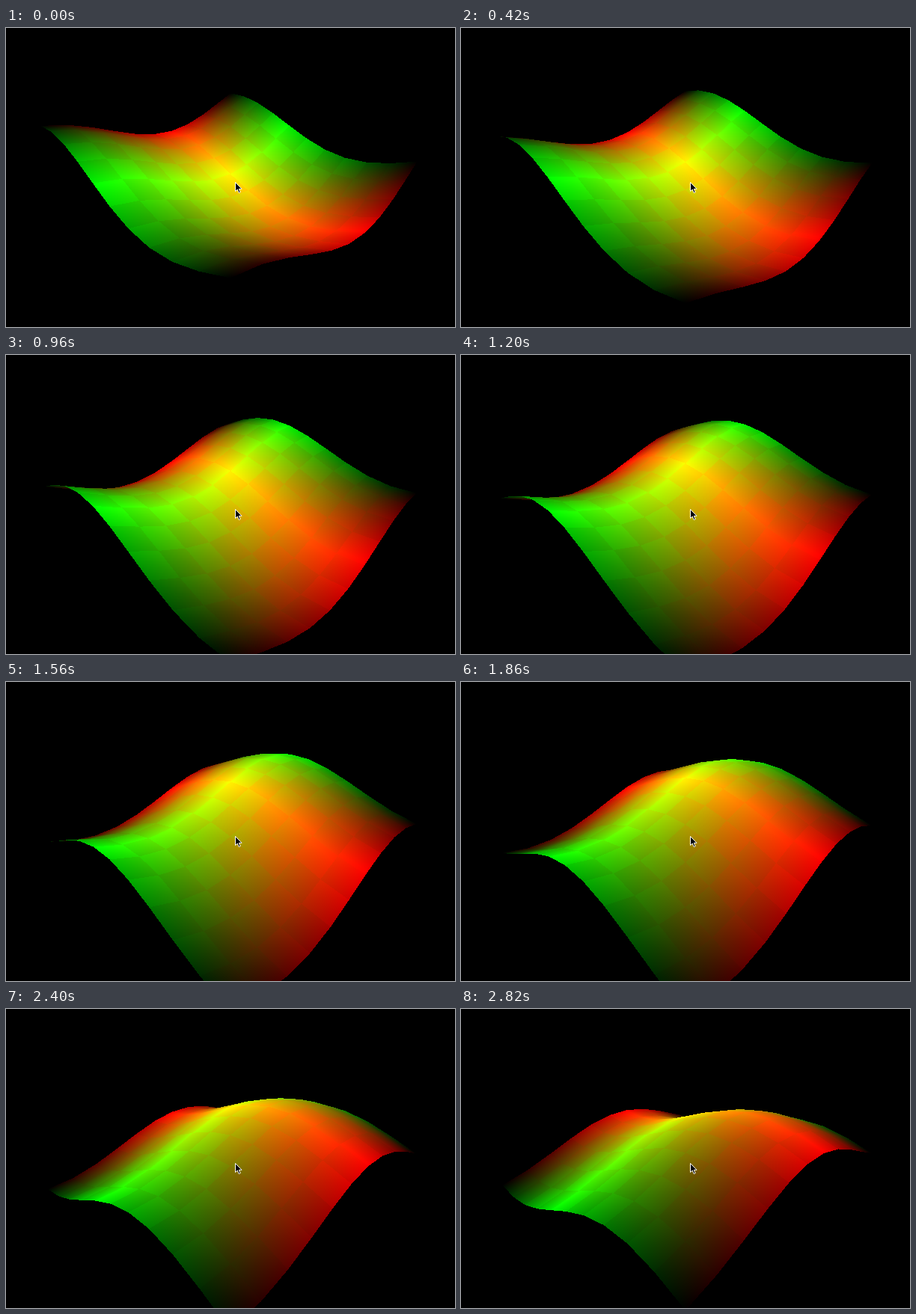
Animation, 600 px wide and 400 px high, one loop 2.88 s. Source, as an HTML page with a canvas:

```html
<!DOCTYPE html>
<html lang="en">
<head>
<meta charset="utf-8">
<title>Wave surface</title>
<style>
  html, body { margin: 0; width: 100%; height: 100%; overflow: hidden; background: #000; }
  canvas, svg { position: absolute; left: 0; top: 0; display: block; }
</style>
</head>
<body>
<canvas id="stage" width="600" height="400"></canvas>
<svg width="600" height="400" viewBox="0 0 600 400">
  <path d="M306.5 206.5V218.5L309.2 216L311.2 220.5L313.2 219.6L311.3 215.3H315Z"
        fill="#000" stroke="#fff" stroke-width="1"/>
</svg>
<script>
const W = 600, H = 400, LOOP = 2880, STEP = 60;
const CELLS = 10;
const SPEED = 0.00118, WAVE = 4.85, PHASE = 2.88, HEIGHT = 28;
const ctx = document.getElementById('stage').getContext('2d');
const image = ctx.createImageData(W, H);
const pixels = new Uint32Array(image.data.buffer);
const BLACK = 0xff000000;

// Rises to 1 at the peak and falls to 0 at both ends
const tent = (p, peak) => p < peak ? p / peak : (1 - p) / (1 - peak);

// u runs from the left corner to the near one, v from the left to the far one
function vertex(i, j, t) {
  const u = i / CELLS, v = j / CELLS;
  const a = SPEED * t - PHASE;
  const drop = HEIGHT * (Math.cos(a - WAVE * u) + Math.cos(a + WAVE * v));
  const near = u - v;
  const depth = 1 - 0.45 * near + 0.00035 * drop;
  return {
    x: 300 + 249 * (u + v - 1) / depth,
    y: 186 + (104 * near + drop) / depth,
    r: 255 * tent(u === 0 && v === 0 ? 0 : v, 0.6),
    g: 255 * tent(u, 0.4)
  };
}

// Gouraud shaded triangle
function triangle(a, b, c, kr, kg) {
  const area = (b.x - a.x) * (c.y - a.y) - (c.x - a.x) * (b.y - a.y);
  if (Math.abs(area) < 1e-6) return;
  const x0 = Math.max(0, Math.floor(Math.min(a.x, b.x, c.x)));
  const x1 = Math.min(W - 1, Math.ceil(Math.max(a.x, b.x, c.x)));
  const y0 = Math.max(0, Math.floor(Math.min(a.y, b.y, c.y)));
  const y1 = Math.min(H - 1, Math.ceil(Math.max(a.y, b.y, c.y)));
  for (let y = y0; y <= y1; y++) {
    const py = y + 0.5;
    for (let x = x0; x <= x1; x++) {
      const px = x + 0.5;
      const wb = ((px - a.x) * (c.y - a.y) - (c.x - a.x) * (py - a.y)) / area;
      const wc = ((b.x - a.x) * (py - a.y) - (px - a.x) * (b.y - a.y)) / area;
      const wa = 1 - wb - wc;
      if (wa < -1e-6 || wb < -1e-6 || wc < -1e-6) continue;
      const r = Math.min(255, kr * (wa * a.r + wb * b.r + wc * c.r));
      const g = Math.min(255, kg * (wa * a.g + wb * b.g + wc * c.g));
      pixels[y * W + x] = (BLACK | g << 8 | r) >>> 0;
    }
  }
}

function draw(t) {
  pixels.fill(BLACK);
  const grid = [];
  for (let i = 0; i <= CELLS; i++) {
    grid.push([]);
    for (let j = 0; j <= CELLS; j++) grid[i].push(vertex(i, j, t));
  }
  // Far cells first
  for (let i = 0; i < CELLS; i++) {
    for (let j = CELLS - 1; j >= 0; j--) {
      const odd = (i + j) % 2;
      const kr = odd ? 1.04 : 0.98, kg = odd ? 0.95 : 1.02;
      const a = grid[i][j], b = grid[i + 1][j];
      const c = grid[i + 1][j + 1], d = grid[i][j + 1];
      triangle(a, c, d, kr, kg);
      triangle(a, b, c, kr, kg);
    }
  }
  ctx.putImageData(image, 0, 0);
}

let shown = -1;
function tick() {
  const t = Math.floor(performance.now() % LOOP / STEP) * STEP;
  if (t !== shown) draw(shown = t);
  requestAnimationFrame(tick);
}
tick();
</script>
</body>
</html>
```
